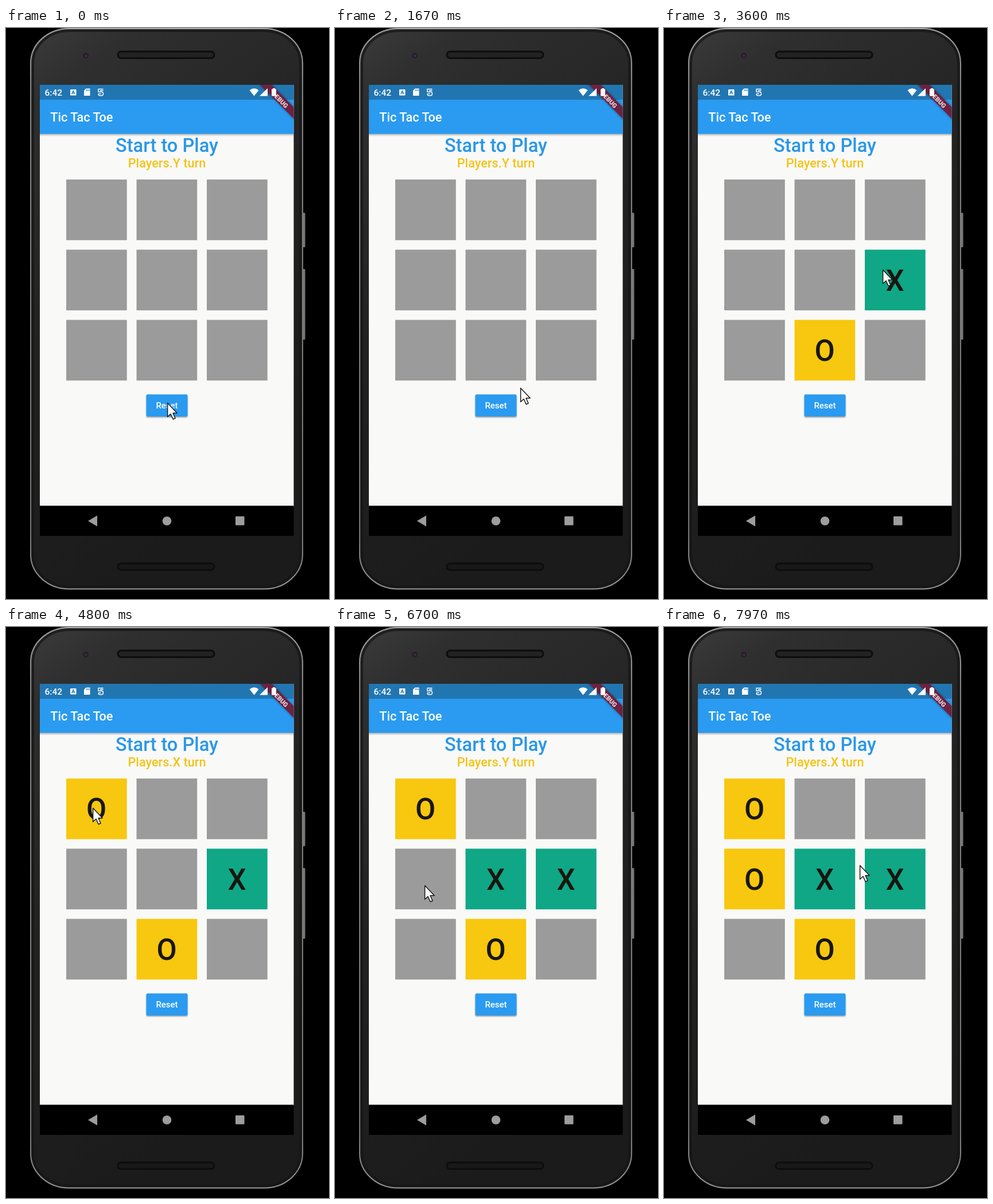
Write an HTML page that moves like this. It is 563x995 px and loops after 8000 ms.

```html
<!DOCTYPE html>
<html lang="en">
<head>
<meta charset="utf-8">
<title>Tic Tac Toe</title>
<style>
  html, body { margin: 0; width: 100%; height: 100%; overflow: hidden; background: #000; }
  svg { display: block; width: 100%; height: 100%; }
  text { font-family: Roboto, "Open Sans", sans-serif; font-weight: 500; }
  .mid { text-anchor: middle; }
  .mark { font-size: 51px; fill: #17160e; }
</style>
</head>
<body>
<svg viewBox="0 0 563 995">
  <defs>
    <linearGradient id="shell" x1="0" y1="0" x2=".35" y2="1">
      <stop offset="0" stop-color="#3b3b3b"/>
      <stop offset=".12" stop-color="#2f2f2f"/>
      <stop offset=".5" stop-color="#222"/>
      <stop offset="1" stop-color="#1b1b1b"/>
    </linearGradient>
    <linearGradient id="rim" x1="0" y1="0" x2="0" y2="1">
      <stop offset="0" stop-color="#a8a8a8"/>
      <stop offset=".1" stop-color="#858585"/>
      <stop offset=".9" stop-color="#757575"/>
      <stop offset="1" stop-color="#989898"/>
    </linearGradient>
    <linearGradient id="fade" x1="0" y1="0" x2="0" y2="1">
      <stop offset="0" stop-color="#000" stop-opacity=".3"/>
      <stop offset="1" stop-color="#000" stop-opacity="0"/>
    </linearGradient>
    <filter id="lift" x="-20%" y="-20%" width="140%" height="150%">
      <feDropShadow dx="0" dy="1.6" stdDeviation="1.3" flood-opacity=".4"/>
    </filter>
    <filter id="glow" x="-20%" y="-20%" width="140%" height="140%">
      <feDropShadow dx="0" dy="0" stdDeviation="2" flood-opacity=".45"/>
    </filter>
    <clipPath id="screen"><path d="M59 99H501.500V885H59Z"/></clipPath>
  </defs>

  <!-- phone -->
  <g fill="#777">
    <rect x="517" y="322" width="4.500" height="60" rx="1.500"/>
    <rect x="517" y="420" width="4.500" height="123" rx="1.500"/>
  </g>
  <rect x="43" y="1" width="474" height="976.500" rx="67" ry="60" fill="url(#shell)" stroke="url(#rim)" stroke-width="2"/>
  <rect x="47" y="5" width="466" height="968.500" rx="63" ry="56" fill="none" stroke="#161616" stroke-width="4" opacity=".75"/>
  <g fill="#222" stroke="#0d0d0d" stroke-width="3">
    <rect x="195" y="41" width="168" height="11.500" rx="5.700"/>
    <rect x="195" y="933" width="168" height="11.500" rx="5.700" fill="#181818"/>
  </g>
  <circle cx="139" cy="48" r="5" fill="#252027"/>
  <circle cx="139.500" cy="48.500" r="2" fill="#4a2a50"/>

  <!-- screen -->
  <g clip-path="url(#screen)">
    <rect x="59" y="99" width="443" height="735" fill="#f9f9f8"/>
    <rect x="59" y="184" width="443" height="5" fill="url(#fade)"/>
    <rect x="59" y="125" width="443" height="59.500" fill="#2a9bf0"/>
    <rect x="59" y="99" width="443" height="26" fill="#2176b2"/>
    <rect x="59" y="832.500" width="443" height="53" fill="#000"/>
    <path d="M433 89H453L511.500 148V168Z" fill="#6c2140" filter="url(#glow)"/>
    <text class="mid" transform="translate(477.500 125) rotate(45)" y="3.900" font-size="11" style="font-weight:900" fill="#ead9e0">DEBUG</text>
  </g>

  <!-- status bar -->
  <g fill="#fff">
    <text x="67.500" y="118" font-size="15.500">6:42</text>
    <rect x="112" y="107" width="10.500" height="10.500" rx="1"/>
    <path d="M114.500 115.300L117.200 109.300L120 115.300M115.600 113.400H118.900" fill="none" stroke="#2176b2" stroke-width="1.300"/>
    <path d="M139.500 105.500H146.500V118H136V109Z"/>
    <path d="M140.500 107V110M142.700 107V110M144.900 107V110" stroke="#2176b2"/>
    <path d="M169.500 106.500H161V111.300H166.500Q169.500 111.300 169.500 114.500T166.500 117.800H163.500Q161 117.800 161 115M164 109H169.500M161 114.500H166" fill="none" stroke="#fff" stroke-width="1.400"/>
    <path d="M424.500 108.500Q432.500 102 440.500 108.500L432.500 118.500Z"/>
    <path d="M456 105V118.500H442Z"/>
    <path d="M463 106.500H465V105H469V106.500H471V118.500H463Z"/>
  </g>

  <!-- app -->
  <text x="77.300" y="163" font-size="21.700" fill="#fff">Tic Tac Toe</text>
  <text class="mid" x="280.500" y="215.500" font-size="32.600" fill="#2a97e8">Start to Play</text>
  <text class="mid" id="turn" x="280.500" y="243" font-size="21.700" fill="#f3c317"></text>
  <g id="board"></g>
  <rect x="244.500" y="638.500" width="72" height="38.500" rx="2.500" fill="#2a9bf0" filter="url(#lift)"/>
  <text class="mid" x="280.500" y="663" font-size="15" fill="#fff">Reset</text>

  <!-- navigation -->
  <g fill="#9d9d9d">
    <path d="M143 859L159 849.500V868.500Z"/>
    <circle cx="280.500" cy="859" r="7.800"/>
    <rect x="400" y="851" width="15.500" height="15.500" rx="1"/>
  </g>

  <path id="cursor" d="M.6 .6V24.500L6 19.500L10.200 28.800L14 27L10 18H17.200Z" fill="#fff" stroke="#181818" stroke-width="1.500" stroke-linejoin="round"/>
</svg>
<script>
const LOOP = 8000;
const $ = id => document.getElementById(id);

// time, tip x, tip y
const path = [
  [0, 281, 653], [1250, 281, 653], [1670, 323, 627], [1980, 286, 568],
  [2300, 286, 568], [2670, 367, 470], [2950, 381, 421], [3720, 381, 421],
  [4420, 151, 315], [4900, 151, 315], [5450, 270, 435], [5900, 270, 435],
  [6550, 156, 450], [7350, 156, 450], [7970, 341, 415], [8000, 345, 414]
];
// time, cell, mark
const moves = [
  [2130, 7, 'O'], [3070, 5, 'X'], [4550, 0, 'O'], [5680, 4, 'X'], [7200, 3, 'O']
];
const colors = { '': '#9b9b9b', O: '#f8c70f', X: '#10a786' };

function add(parent, tag, attrs) {
  const el = document.createElementNS('http://www.w3.org/2000/svg', tag);
  for (const key in attrs) el.setAttribute(key, attrs[key]);
  return parent.appendChild(el);
}

const cells = Array.from({ length: 9 }, (_, i) => {
  const x = 105 + (i % 3) * 122.5;
  const y = 264 + Math.floor(i / 3) * 122.3;
  return {
    box: add($('board'), 'rect', { x, y, width: 105.7, height: 105.7 }),
    label: add($('board'), 'text', { x: x + 52.7, y: y + 71.3, class: 'mark mid' })
  };
});

function pointer(t) {
  const i = path.findIndex(p => p[0] > t);
  const [t0, x0, y0] = path[i - 1];
  const [t1, x1, y1] = path[i];
  const u = (t - t0) / (t1 - t0);
  const k = u * u * (3 - 2 * u);
  return [x0 + (x1 - x0) * k, y0 + (y1 - y0) * k];
}

let shown = -1;
function drawBoard(count) {
  if (count === shown) return;
  shown = count;
  const marks = Array(9).fill('');
  for (const [, cell, mark] of moves.slice(0, count)) marks[cell] = mark;
  cells.forEach(({ box, label }, i) => {
    box.setAttribute('fill', colors[marks[i]]);
    label.textContent = marks[i];
  });
  $('turn').textContent = `Players.${count % 2 ? 'X' : 'Y'} turn`;
}

function draw(now) {
  const t = Math.max(0, now) % LOOP;
  drawBoard(moves.filter(m => m[0] <= t).length);
  $('cursor').setAttribute('transform', `translate(${pointer(t)})`);
}

let start;
function tick(now) {
  start ??= now;
  draw(now - start);
  requestAnimationFrame(tick);
}
draw(0);
requestAnimationFrame(tick);
</script>
</body>
</html>
```
